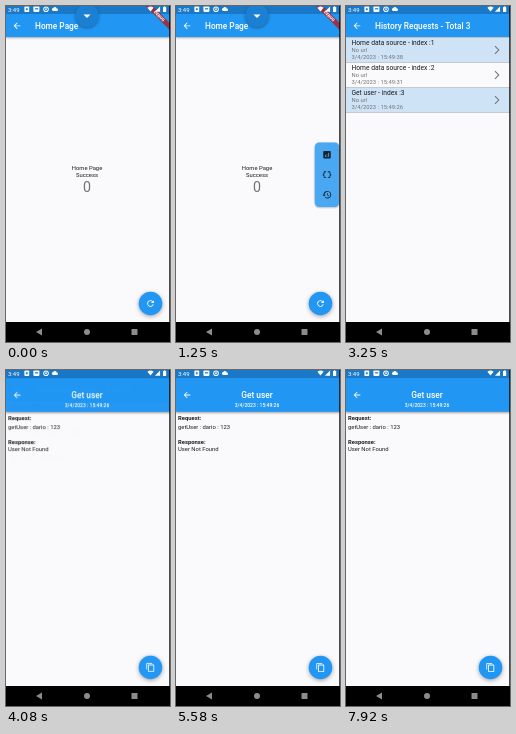
An HTML page with a canvas for the animation above (8000 ms loop, 164 by 336 pixels).

```html
<!DOCTYPE html>
<html lang="en">
<head>
<meta charset="utf-8">
<title>Request inspector</title>
<style>
  html, body { margin: 0; width: 100%; height: 100%; overflow: hidden; background: #000; }
  canvas { display: block; width: 164px; height: 336px; }
</style>
</head>
<body>
<canvas id="stage"></canvas>
<script>
const W = 164, H = 336, BODY = 316, LOOP = 8000;
const BLUE = '#2196f3', STATUS = '#1a78c6', PAPER = '#faf9fc', GREY = '#737376', INK = '#1c1c1e';
const ratio = window.devicePixelRatio || 1;

const ICONS = {
  back: 'M20 11H7.83l5.59-5.59L12 4l-8 8 8 8 1.41-1.41L7.83 13H20z',
  refresh: 'M17.65 6.35A8 8 0 1 0 19.73 14h-2.08A6 6 0 1 1 12 6c1.66 0 3.14.69 4.22 1.78L13 11h7V4z',
  copy: 'M16 1H4a2 2 0 0 0-2 2v14h2V3h12zM19 5H8a2 2 0 0 0-2 2v14a2 2 0 0 0 2 2h11a2 2 0 0 0 2-2V7a2 2 0 0 0-2-2zm0 16H8V7h11z',
  history: 'M13 3a9 9 0 0 0-9 9H1l4 4 4-4H6a7 7 0 1 1 2.06 4.94l-1.42 1.42A9 9 0 1 0 13 3zM12 8v5l4.28 2.54.72-1.21-3.5-2.08V8z',
  chart: 'M19 3H5a2 2 0 0 0-2 2v14a2 2 0 0 0 2 2h14a2 2 0 0 0 2-2V5a2 2 0 0 0-2-2zM9 17H7v-5h2zm4 0h-2v-3h2zm0-5h-2v-2h2zm4 5h-2V7h2z',
  brace: 'M4 7v2a1 1 0 0 1-1 1H2v4h1a1 1 0 0 1 1 1v2a3 3 0 0 0 3 3h3v-2H7a1 1 0 0 1-1-1v-2a3 3 0 0 0-2-3 3 3 0 0 0 2-3V7a1 1 0 0 1 1-1h3V4H7a3 3 0 0 0-3 3z',
  next: 'M6.23 20.23 8 22l10-10L8 2 6.23 3.77 14.46 12z',
  drop: 'M7 10l5 5 5-5z',
  cloud: 'M19 10A7.5 7.5 0 0 0 5 8a6 6 0 0 0 1 12h13a5 5 0 0 0 0-10z',
  wifi: 'M12 21 24 6Q12-2 0 6z',
  signal: 'M2 22h20V2z'
};

function makeCanvas(el = document.createElement('canvas')) {
  el.width = W * ratio;
  el.height = H * ratio;
  const c = el.getContext('2d');
  c.scale(ratio, ratio);
  return c;
}

function rect(c, x, y, w, h, fill, r = 0) {
  c.fillStyle = fill;
  c.beginPath();
  c.roundRect(x, y, w, h, r);
  c.fill();
}

function disc(c, x, y, r, fill) {
  c.fillStyle = fill;
  c.beginPath();
  c.arc(x, y, r, 0, Math.PI * 2);
  c.fill();
}

function text(c, str, x, y, size, fill, weight = 400, align = 'left') {
  c.font = `${weight} ${size}px Roboto, sans-serif`;
  c.textAlign = align;
  c.fillStyle = fill;
  c.fillText(str, x, y);
}

function icon(c, name, x, y, size, fill, flip = 1) {
  c.save();
  c.translate(x, y);
  c.scale(flip * size / 24, size / 24);
  c.translate(-12, -12);
  c.fillStyle = fill;
  c.fill(new Path2D(ICONS[name]), 'evenodd');
  c.restore();
}

function withShadow(c, blur, dy, draw) {
  c.save();
  c.shadowColor = 'rgba(0,0,0,.35)';
  c.shadowBlur = blur * ratio;
  c.shadowOffsetY = dy * ratio;
  draw();
  c.restore();
}

function scaffold(c, barBottom, backY) {
  rect(c, 0, 0, W, BODY, PAPER);
  withShadow(c, 2, 0.8, () => rect(c, 0, 0, W, barBottom, BLUE));
  rect(c, 0, 0, W, 8, STATUS);
  icon(c, 'back', 11, backY, 10, '#fff');
}

function fab(c, name) {
  withShadow(c, 4, 1.2, () => disc(c, 144.5, 297.5, 11.8, BLUE));
  icon(c, name, 144.5, 297.5, 10, '#fff');
}

function drawHome(c) {
  scaffold(c, 31, 19.8);
  text(c, 'Home Page', 29, 22.9, 8.3, '#fff', 500);
  text(c, 'Home Page', 81, 164, 5.86, INK, 400, 'center');
  text(c, 'Success', 81, 170.8, 5.86, INK, 400, 'center');
  text(c, '0', 81, 185.6, 14.2, GREY, 400, 'center');
  fab(c, 'refresh');
}

function drawHomeOverlay(c) {
  withShadow(c, 3, 0.8, () => disc(c, 81, 9.6, 11.7, '#1c80d2'));
  icon(c, 'drop', 81, 9.8, 17, '#fff');
  c.save();
  c.translate(163.3, 0);
  c.rotate(Math.PI / 4);
  rect(c, -18, 11.7, 36, 5, 'rgba(183,28,28,.8)');
  text(c, 'DEBUG', 0, 15.7, 4.2, '#fff', 900, 'center');
  c.restore();
}

function drawHistory(c) {
  scaffold(c, 31, 19.8);
  text(c, 'History Requests - Total 3', 29, 22.9, 8.3, '#fff', 500);
  const rows = [
    ['Home data source - index :1', '38'],
    ['Home data source - index :2', '31'],
    ['Get user - index :3', '26']
  ];
  rows.forEach(([title, sec], i) => {
    const y = 32 + i * 25;
    if (i % 2 === 0) rect(c, 0, y, W, 24, '#cfe3f7');
    rect(c, 0, y + 24, W, 1, '#c3cad2');
    text(c, title, 5.5, y + 7.4, 6.7, INK);
    text(c, 'No url', 5.5, y + 14.3, 5.86, GREY);
    text(c, '3/4/2023 : 15:49:' + sec, 5.5, y + 21.2, 5.86, GREY);
    icon(c, 'next', 151, y + 12, 10, GREY);
  });
}

function drawDetail(c) {
  scaffold(c, 41.8, 25);
  text(c, 'Get user', 81, 28.2, 8.4, '#fff', 500, 'center');
  text(c, '3/4/2023 : 15:49:26', 81, 36.8, 5, '#fff', 500, 'center');
  text(c, 'Request:', 2, 50.2, 5.86, INK, 700);
  text(c, 'getUser : dario : 123', 2, 59.2, 5.86, INK);
  text(c, 'Response:', 2, 74.2, 5.86, INK, 700);
  text(c, 'User Not Found', 2, 81.2, 5.86, INK);
  fab(c, 'copy');
}

function drawPanel(c, shift) {
  c.save();
  c.translate(shift, 0);
  withShadow(c, 2, 0.6, () => rect(c, 138.8, 136.5, 24.4, 64.5, '#4aa8f3', 4.5));
  icon(c, 'chart', 151, 148.8, 10, '#16202a');
  icon(c, 'brace', 151, 168.7, 10, '#16202a');
  icon(c, 'brace', 151, 168.7, 10, '#16202a', -1);
  icon(c, 'history', 151, 188.7, 10, '#16202a');
  c.restore();
}

function drawSystem(c) {
  text(c, '3:49', 2, 5.6, 6, '#fff');
  rect(c, 18.4, 0.5, 4.8, 5.4, '#fff', 0.7);
  rect(c, 19.9, 2.3, 1.8, 1.9, STATUS);
  rect(c, 27.4, 0.5, 6, 5.4, '#fff', 0.8);
  rect(c, 29, 2.2, 3.2, 1.2, STATUS);
  disc(c, 40, 3.2, 2.8, '#fff');
  disc(c, 40, 3.2, 1.8, STATUS);
  disc(c, 40, 3.2, 0.9, '#fff');
  icon(c, 'cloud', 49, 2.9, 6, '#fff');
  icon(c, 'wifi', 144.5, 3.2, 6.2, '#fff');
  icon(c, 'signal', 151.5, 3.2, 6.2, '#fff');
  rect(c, 157, 0.9, 3.2, 5.2, '#fff', 0.4);
  rect(c, 157.9, 0.3, 1.4, 0.8, '#fff');

  rect(c, 0, BODY, W, H - BODY, '#000');
  rect(c, 163.3, 0, 0.7, H, '#000');
  const tone = '#8c8c8c';
  c.fillStyle = tone;
  c.fill(new Path2D('M30 326l6-3.4v6.8z'));
  disc(c, 81, 326, 3, tone);
  rect(c, 125.5, 323, 6, 6, tone, 0.5);
}

function page(...layers) {
  const c = makeCanvas();
  layers.forEach(draw => draw(c));
  return c.canvas;
}

const home = page(drawHome);
const overlay = page(drawHomeOverlay);
const historyPage = page(drawHistory);
const detail = page(drawDetail);
const system = page(drawSystem);
const ctx = makeCanvas(document.getElementById('stage'));

const clamp = v => Math.min(1, Math.max(0, v));
const easeOut = v => 1 - (1 - v) ** 3;
const phase = (t, start, length) => easeOut(clamp((t - start) / length));

function put(layer) {
  ctx.drawImage(layer, 0, 0, W, H);
}

// New pages fade in while growing slightly to full size.
function enter(layer, p) {
  if (p <= 0) return;
  const s = 0.92 + 0.08 * p;
  ctx.save();
  ctx.globalAlpha = p;
  ctx.translate(W / 2, BODY / 2);
  ctx.scale(s, s);
  ctx.translate(-W / 2, -BODY / 2);
  put(layer);
  ctx.restore();
}

function render(t) {
  const slide = phase(t, 620, 300);
  const toHistory = phase(t, 1390, 250);
  const toDetail = phase(t, 3890, 250);
  ctx.clearRect(0, 0, W, H);
  if (toHistory < 1) {
    put(home);
    if (slide > 0) drawPanel(ctx, (1 - slide) * 27);
    put(overlay);
  }
  if (toDetail < 1) enter(historyPage, toHistory);
  else put(detail);
  if (toDetail > 0 && toDetail < 1) enter(detail, toDetail);
  put(system);
}

const start = performance.now();
function tick() {
  render((performance.now() - start) % LOOP);
  requestAnimationFrame(tick);
}
tick();
</script>
</body>
</html>
```
